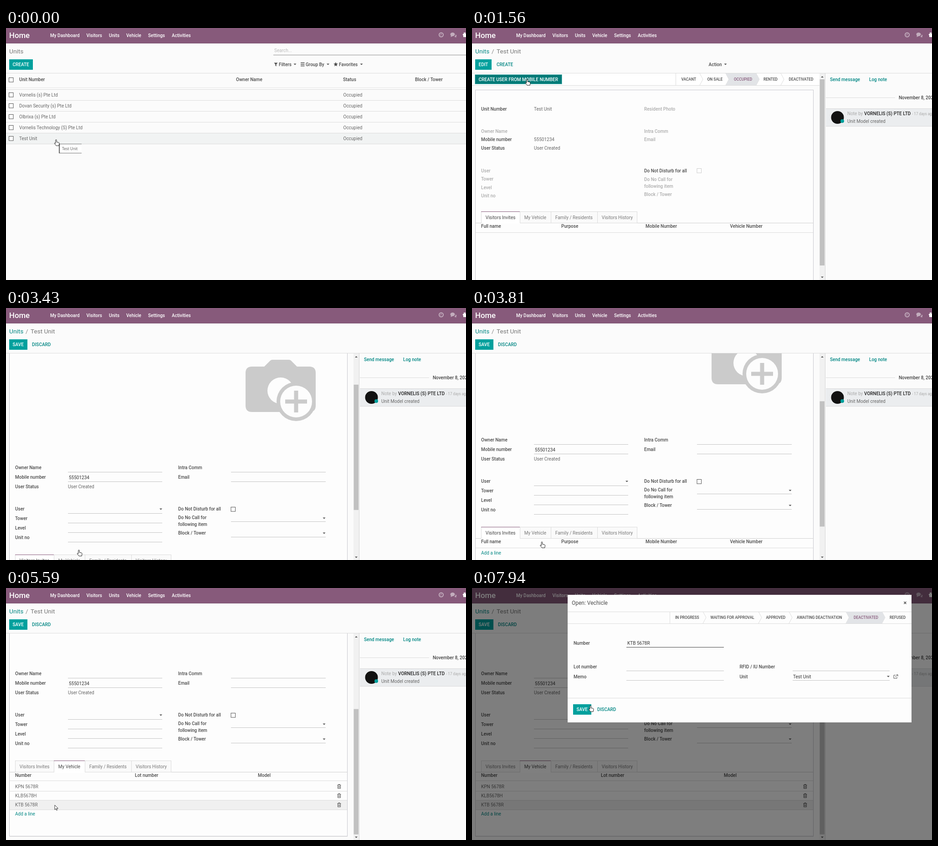
These frames come from a looping animation (1010 by 555 pixels, 8000 ms). An HTML page:

```html
<!DOCTYPE html>
<html lang="en">
<head>
<meta charset="utf-8">
<title>Units</title>
<style>
html, body { margin: 0; width: 100%; height: 100%; overflow: hidden; background: #fbfbfb; }
svg { display: block; font-family: Roboto, sans-serif; }
.tip { font-family: "Open Sans", "Noto Sans", sans-serif; }
text { white-space: pre; }
</style>
</head>
<body>
<svg id="stage" width="1010" height="555" viewBox="0 0 1010 555"></svg>
<script>
const TEAL = '#00a09d', DARK_TEAL = '#007b78', LINK = '#008784', PURPLE = '#875a7b';
const INK = '#4c4c4c', VALUE = '#666', FAINT = '#adadad', RULE = '#dcdcdc';
const COMPANY = 'Vornelis', PHONE = '55501234', PLATES = ['KPN 5678R', 'KLB5678H', 'KTB 5678R'];

// y is the middle of the capitals
const text = (x, y, s, fill = INK, weight = 500, size = 10, extra = '') =>
  `<text x="${x}" y="${y + size * .36}" fill="${fill}" font-weight="${weight}" font-size="${size}" ${extra}>${s}</text>`;
const plain = (x, y, s, fill = VALUE) => text(x, y, s, fill, 400);
const rect = (x, y, w, h, fill, extra = '') =>
  `<rect x="${x}" y="${y}" width="${w}" height="${h}" fill="${fill}" ${extra}/>`;
const hline = (x1, x2, y, fill = RULE) => rect(x1, y, x2 - x1, 1, fill);
const path = (d, fill, extra = '') => `<path d="${d}" fill="${fill}" ${extra}/>`;
const circle = (x, y, r, fill) => `<circle cx="${x}" cy="${y}" r="${r}" fill="${fill}"/>`;
const group = (id, ...parts) => `<g id="${id}">${parts.join('')}</g>`;
const caret = (x, y) => path(`M${x - 3} ${y - 1.5}h6l-3 3z`, INK);
const box = (x, y, stroke = '#555') => rect(x - 4.5, y - 4.5, 9.5, 9.5, '#fff', `stroke="${stroke}"`);
const button = (x, y, w, s, id) => rect(x, y, w, 23, TEAL, `id="${id}"`) + text(x + 7.5, y + 11, s, '#fff');
const trash = y => path(`M727.5 ${y - 3}h8M730 ${y - 3}v-1.5h3v1.5M728.5 ${y - 3}v7.5h6v-7.5M730.5 ${y - 1}v4M732.5 ${y - 1}v4`,
  'none', 'stroke="#555"');

// Steps are [label x, label, right-hand tip]
function statusBar(left, top, h, steps, ids = []) {
  const bottom = top + h, mid = top + h / 2, last = steps.length - 1;
  const chevron = tip => `${tip - 7} ${top}L${tip} ${mid}L${tip - 7} ${bottom}`;
  let s = rect(left, top, 1, h, RULE);
  steps.forEach(([x, label, tip], i) => {
    const prev = i ? steps[i - 1][2] : left;
    if (i < last) s += path('M' + chevron(tip), 'none', `stroke="${RULE}"`);
    if (ids[i]) s += group(ids[i], path(`M${chevron(prev)}H${tip - 7}L${tip} ${mid}L${tip - 7} ${top}Z`, '#e2e4e7'),
      text(x, mid, label, PURPLE, 500, 8.4));
    s += `<g ${ids[i] ? `id="${ids[i]}Off"` : ''}>${text(x, mid, label, INK, 500, 8.4)}</g>`;
  });
  return s;
}

function navBar() {
  const items = [[97, 'My Dashboard'], [176.5, 'Visitors'], [226, 'Units'], [264, 'Vehicle'], [312, 'Settings'], [364, 'Activities']];
  const pale = '#c3adbd';
  return rect(0, 0, 1010, 34, PURPLE) + hline(0, 1010, 33, '#7a5070') + text(7, 16, 'Home', '#fff', 500, 16.8) +
    items.map(([x, s]) => text(x, 16, s, '#fff')).join('') +
    `<circle cx="955.5" cy="15" r="4.5" fill="none" stroke="${pale}" stroke-width="2"/>` +
    path('M955.5 12v3.5h-2.5', 'none', `stroke="${pale}"`) +
    `<ellipse cx="980.5" cy="14" rx="5" ry="4" fill="${pale}"/>` + path('M977 16l-.5 4 4-2zM984 19q4-1 3-5 4 3 1 5l1 2z', pale) +
    path('M1003 13h9v3h-9zM1004 16h8v4h-8zM1005 10h4v3h-4z', '#fff');
}

function listView() {
  const names = [`${COMPANY} (s) Pte Ltd`, 'Dovan Security (s) Pte Ltd', 'Olbrixa (s) Pte Ltd', `${COMPANY} Technology (S) Pte Ltd`, 'Test Unit'];
  const heads = [[29, 'Unit Number'], [505, 'Owner Name'], [740, 'Status'], [898, 'Block / Tower']];
  return group('list',
    text(7, 51, 'Units', '#777', 400, 13.7), button(7, 69, 52, 'CREATE'),
    plain(589, 49, 'Search...', '#bbb'), hline(587, 1010, 59, '#8f8f8f'),
    path('M588.5 76.5h8l-3 3.5v4.5l-2-1.5v-3z', INK), text(599, 80, 'Filters'), caret(634.5, 80),
    path('M647 76.5h8.5M647 80h8.5M647 83.5h8.5', 'none', `stroke="${INK}" stroke-width="1.6"`), text(658, 80, 'Group By'), caret(707, 80),
    path('M724 75l1.4 3.2 3.4.3-2.6 2.3.8 3.4-3-1.8-3 1.8.8-3.4-2.6-2.3 3.4-.3z', INK), text(731, 80, 'Favorites'), caret(780.5, 80),
    hline(0, 1010, 99), box(11, 114), heads.map(([x, s]) => text(x, 113, s)).join(''),
    hline(0, 1010, 131, '#e6e6e6'), hline(0, 1010, 135),
    rect(0, 232, 1010, 23, '#f1f3f3'),
    names.map((s, i) => {
      const y = 147 + 24 * i;
      return box(11, y) + plain(29, y, s) + plain(740.5, y, 'Occupied') + hline(0, 1010, y + 12);
    }).join(''),
    group('tooltip', rect(117, 255.5, 49, 20, '#fff'), path('M117 275.5V255.5H166M117 275.5H166', 'none', 'stroke="#777"'),
      rect(116.5, 255, 1.2, 21, '#333'), text(123, 265.5, 'Test Unit', '#555', 400, 8.4, 'class="tip"')));
}

const labels = (rows, color) => rows.map(([x, y, s]) => text(x, y, s, color)).join('');

function tabs(top, active) {
  const items = [[20, 105, 'Visitors Invites'], [105, 173, 'My Vehicle'], [173, 275, 'Family / Residents'], [275, 362, 'Visitors History']];
  return hline(8, 750, top + 25, '#d0d0d0') + items.map(([a, b, s], i) =>
    rect(a + .5, top + .5, b - a, 25, i == active ? '#fff' : '#fafafa', `stroke="${RULE}"`) +
    (i == active ? hline(a, b + 1, top, PURPLE) + rect(a + 1, top + 25, b - a - 1, 2, '#fff') : '') +
    plain(a + 9.8, top + 13, s, i == active ? '#444' : '#777')).join('');
}

const visitHeads = y => labels([[20, y, 'Full name'], [196, y, 'Purpose'], [381, y, 'Mobile Number'], [566.5, y, 'Vehicle Number']]) +
  hline(8, 749, y + 14);

function readBody() {
  return group('read',
    labels([[20, 178, 'Unit Number'], [20, 245.5, 'Mobile number'], [20, 264, 'User Status'], [378, 314, 'Do Not Disturb for all']]),
    labels([[378, 178, 'Resident Photo'], [20, 227, 'Owner Name'], [378, 227, 'Intra Comm'], [378, 245.5, 'Email'], [20, 314, 'User'],
      [20, 332, 'Tower'], [20, 351, 'Level'], [20, 369, 'Unit no'], [378, 333, 'Do No Call for'], [378, 348, 'following item'],
      [378, 366, 'Block / Tower']], FAINT),
    plain(136, 178, 'Test Unit'), plain(136, 245.5, PHONE), plain(136, 264, 'User Created'), box(498.5, 314, '#ccc'),
    tabs(404, 0), visitHeads(436));
}

function camera() {
  const grey = '#cbcbcb';
  return path('M540 222H567L580 209Q582 207 585 207H621Q624 207 626 209L639 222H666Q680 222 680 236V308Q680 322 666 322H540Q526 322 526 308V236Q526 222 540 222Z', grey) +
    circle(603, 275, 29, '#fdfdfd') + circle(637, 299, 43, grey) + circle(637, 299, 35, '#fdfdfd') +
    rect(613, 294.5, 48, 9, grey) + rect(632.5, 275, 9, 48, grey);
}

function editBody() {
  const left = [454, 475, 545, 566, 587, 608], right = [454, 475, 563, 597];
  return group('edit',
    labels([[20, 178, 'Unit Number'], [378, 178, 'Resident Photo'], [20, 444, 'Owner Name'], [378, 444, 'Intra Comm'],
      [20, 465, 'Mobile number'], [378, 465, 'Email'], [20, 486, 'User Status'], [20, 535.5, 'User'], [20, 556.5, 'Tower'],
      [20, 577.5, 'Level'], [20, 598.5, 'Unit no'], [378, 535.5, 'Do Not Disturb for all'], [378, 554.5, 'Do No Call for'],
      [378, 569.5, 'following item'], [378, 588, 'Block / Tower']]),
    plain(138, 179, 'Test Unit', '#333'), hline(136, 343, 187, '#444'), rect(177, 174, 1, 11, '#222', 'id="caretUnit"'),
    camera(), plain(138, 466, PHONE, '#333'), plain(136, 486, 'User Created'), box(498.5, 536),
    left.map(y => hline(136, 343, y, '#c4c4c4')).join(''), right.map(y => hline(494, 702, y, '#c4c4c4')).join(''),
    caret(340, 536), caret(698.5, 556), caret(698.5, 589),
    group('visits', tabs(636, 0), visitHeads(668), text(20, 693, 'Add a line', LINK, 400)),
    group('vehicles', tabs(636, 1), labels([[20, 668, 'Number'], [283, 668, 'Lot number'], [553, 668, 'Model']]), hline(8, 749, 680),
      rect(8, 723, 741, 21, '#f0f0f0', 'id="rowHover"'),
      PLATES.map((s, i) => plain(20, 693 + 20.3 * i, s) + trash(693 + 20.3 * i) + hline(8, 749, Math.round(703 + 20.3 * i))).join(''),
      text(20, 753, 'Add a line', LINK, 400)));
}

function formView() {
  return group('form',
    text(7, 51, 'Units', LINK, 400, 13.7), text(43, 51, '/', '#888', 400, 13.7), text(54, 51, 'Test Unit', '#777', 400, 13.6),
    group('readTools', button(7, 69, 36, 'EDIT', 'editBtn'), text(54, 80, 'CREATE', LINK), text(519.5, 80, 'Action'), caret(556.5, 80)),
    group('editTools', button(7, 69, 40, 'SAVE', 'saveBtn'), text(57, 80, 'DISCARD', LINK)),
    `<svg y="100" width="775" height="455" viewBox="0 100 775 455">`,
    group('scroll',
      rect(0, 100, 763, 27, '#fff'), hline(0, 763, 126),
      rect(6, 102, 192, 22, '#8fd0cf', 'id="focusRing"'), rect(7, 103, 190, 20, TEAL, 'id="userBtn"'),
      text(14.5, 113, 'CREATE USER FROM MOBILE NUMBER', '#fff'),
      statusBar(447, 100, 26, [[459.5, 'VACANT', 507], [516.5, 'ON SALE', 564], [575, 'OCCUPIED', 631], [640, 'RENTED', 685], [695.5, 'DEACTIVATED', 763]], [, , 'occupied']),
      rect(7.5, 136.5, 742, 666, '#fdfdfd', 'stroke="#c9c9cf"'), hline(8, 750, 803, '#e8e8e8'),
      readBody(), editBody()),
    '</svg>', hline(0, 1010, 99),
    rect(763, 100, 12, 455, '#f1f1f1'), rect(763.5, 113, 10.5, 276, '#c1c1c1', 'id="thumb"'),
    path('M766 109h6l-3-3zM766 547.5h6l-3 3z', '#505050'),
    rect(775, 100, 1, 455, '#d5d5d5'),
    text(786, 113, 'Send message', LINK), text(872, 113, 'Log note', LINK),
    hline(777, 929, 153), text(937, 153, 'November 8, 2021', '#444'),
    rect(777, 177, 233, 39, '#ebedef'), hline(777, 1010, 177), hline(777, 1010, 216),
    circle(802.5, 197, 14, '#111'), circle(813, 205, 4, TEAL),
    plain(824, 188, 'Note by', '#aaa'), text(861, 188, COMPANY.toUpperCase() + ' (S) PTE LTD', '#222'),
    text(966, 189, '- 17 days ago', '#aaa', 400, 8.2), plain(824, 205, 'Unit Model created'));
}

function modal() {
  return rect(0, 0, 1010, 555, '#000', 'id="shade"') + group('modal',
    rect(210, 15, 755, 281, '#fdfdfd'), text(219, 33, 'Open: Vechicle', INK, 400, 12), text(947.5, 32, '×', '#555', 700, 13),
    hline(210, 965, 52), hline(210, 965, 78), hline(210, 965, 242),
    statusBar(434, 52, 26, [[446, 'IN PROGRESS', 514], [523.5, 'WAITING FOR APPROVAL', 636], [645.5, 'APPROVED', 703],
      [713, 'AWAITING DEACTIVATION', 828], [838, 'DEACTIVATED', 907], [917, 'REFUSED', 965]], [, , 'approved', , 'deactivated']),
    labels([[223, 121, 'Number'], [223, 173.5, 'Lot number'], [223, 195, 'Memo'], [587.5, 173.5, 'RFID / IU Number'], [587.5, 195, 'Unit']]),
    plain(341, 121.5, PLATES[2], '#333'), rect(389, 115, 1, 13, '#222', 'id="caretNumber"'), hline(339, 553, 130, '#444'),
    [182, 203].map(y => hline(339, 553, y, '#c4c4c4') + hline(704, 917, y, '#c4c4c4')).join(''),
    plain(705, 195, 'Test Unit', '#333'), caret(914, 195),
    path('M930 192h-4v7h7v-3M929 196l6-5M931.5 191h3.5v3.5', 'none', 'stroke="#555"'),
    button(222, 256, 40, 'SAVE'), text(275, 267.5, 'DISCARD', LINK));
}

document.getElementById('stage').innerHTML = rect(0, 0, 1010, 555, '#fbfbfb') + navBar() + listView() + formView() + modal() +
  group('bubble', path('M0 538H386Q389 538 389 541V555H0Z', '#2b2c2f', 'id="bubbleBox"'),
    text(-3, 547, '', '#ccc', 400, 8.8, 'id="bubbleText" class="tip"')) +
  group('cursor',
    path('M-1.2 1.2a1.2 1.2 0 0 1 2.4 0V5.2L5.8 6.2Q7 6.6 7 8.2L6.2 13.2H.2L-3.6 8.4q-.4-1.4 1-1.2L-1.2 8.2Z', '#fff', 'id="hand" stroke="#222"'),
    path('M0 0V10.2L2.4 8 4 11.7 5.6 11 4 7.4H7.4Z', '#fff', 'id="arrow" stroke="#222" stroke-width=".9"'));

const el = {};
document.querySelectorAll('[id]').forEach(e => el[e.id] = e);
const show = (id, on) => el[id].style.display = on ? '' : 'none';
const paint = (id, fill) => el[id].setAttribute('fill', fill);
const move = (id, x, y) => el[id].setAttribute('transform', `translate(${x} ${y})`);

// Keys are [start, end, ...values]; each move advances in even steps of about 77 ms
function track(keys, t) {
  let v = keys[0].slice(2);
  for (const [a, b, ...to] of keys) {
    if (t < a) break;
    const n = Math.round((b - a) / 77) + 1;
    const k = b > a ? Math.floor((t - a) / (b - a) * (n - 1) + 1e-6) + 1 : 1;
    const p = Math.min(1, k / n);
    v = v.map((c, i) => c + (to[i] - c) * p);
  }
  return v;
}

const SCROLL = [[0, 0, 0], [3270, 3270, 20], [3350, 3350, 70], [3430, 3430, 93], [3510, 3590, 154], [4820, 4900, 256]];
// x, y, hand
const POINTER = [[0, 0, 110, 246, 1], [770, 770, 110, 246, 0], [1100, 1480, 119, 132, 0], [1560, 1560, 121, 113, 1],
  [1640, 1870, 87, 78, 1], [1950, 2250, 25, 80, 1], [2500, 2720, 61, 160, 0], [2790, 3030, 120, 340, 0], [3270, 3350, 158, 520, 0],
  [3430, 3430, 160, 533, 1], [3510, 4040, 147, 497, 1], [5130, 5130, 147, 495, 0], [5280, 5590, 107, 478, 0],
  [6130, 6280, 807, 2, 0], [6600, 6750, 888, 42, 0], [6820, 6980, 848, 66, 1], [7550, 7710, 282, 259, 1], [7940, 7940, 260, 259, 1]];
const FADE = [[0, 0, 0], [5740, 5900, 1]];

function draw(now) {
  const t = now % 8000, editing = t >= 2430, within = (a, b) => t >= a && t < b;
  const [scroll] = track(SCROLL, t), [x, y, hand] = track(POINTER, t), [fade] = track(FADE, t);

  show('list', t < 770);
  show('tooltip', t < 530);
  show('form', t >= 770);
  for (const id of ['read', 'readTools']) show(id, !editing);
  for (const id of ['edit', 'editTools']) show(id, editing);
  move('scroll', 0, -scroll);
  el.thumb.setAttribute('y', 113 + (editing ? .6 * scroll : 0));
  el.thumb.setAttribute('height', editing ? 276 : 410);

  const pressed = within(1560, 1640);
  show('focusRing', pressed);
  paint('userBtn', pressed ? DARK_TEAL : TEAL);
  paint('editBtn', within(2100, 2430) ? DARK_TEAL : TEAL);
  paint('saveBtn', within(2430, 2870) ? DARK_TEAL : TEAL);
  show('caretUnit', within(2430, 3030));
  show('occupiedOff', false);
  show('visits', t < 4450);
  show('vehicles', t >= 4450);
  show('rowHover', t >= 5510);

  const waiting = t < 4000;
  show('bubble', within(940, 1480) || within(2510, 3030) || within(4210, 5440));
  el.bubble.setAttribute('opacity', within(4210, 4280) || within(5360, 5440) ? .5 : 1);
  move('bubbleBox', waiting ? 0 : -149, 0);
  el.bubbleText.textContent = waiting ? 'Waiting for dashboard.qeyplus.com...' : 'https://dashboard.qeyplus.com/web#notebook_page_339';

  show('shade', fade > 0);
  show('modal', fade > 0);
  el.shade.setAttribute('opacity', fade * .5);
  el.modal.setAttribute('opacity', fade);
  move('modal', 0, -38 * (1 - fade) ** 2);
  const off = t >= 7150;
  show('approved', !off);
  show('approvedOff', off);
  show('deactivated', off);
  show('deactivatedOff', !off);
  show('caretNumber', Math.floor((t - 5900) / 530) % 2 == 0);

  move('cursor', x, y);
  show('hand', hand > .5);
  show('arrow', hand <= .5);
}

function loop() {
  draw(performance.now());
  requestAnimationFrame(loop);
}
loop();
</script>
</body>
</html>
```
